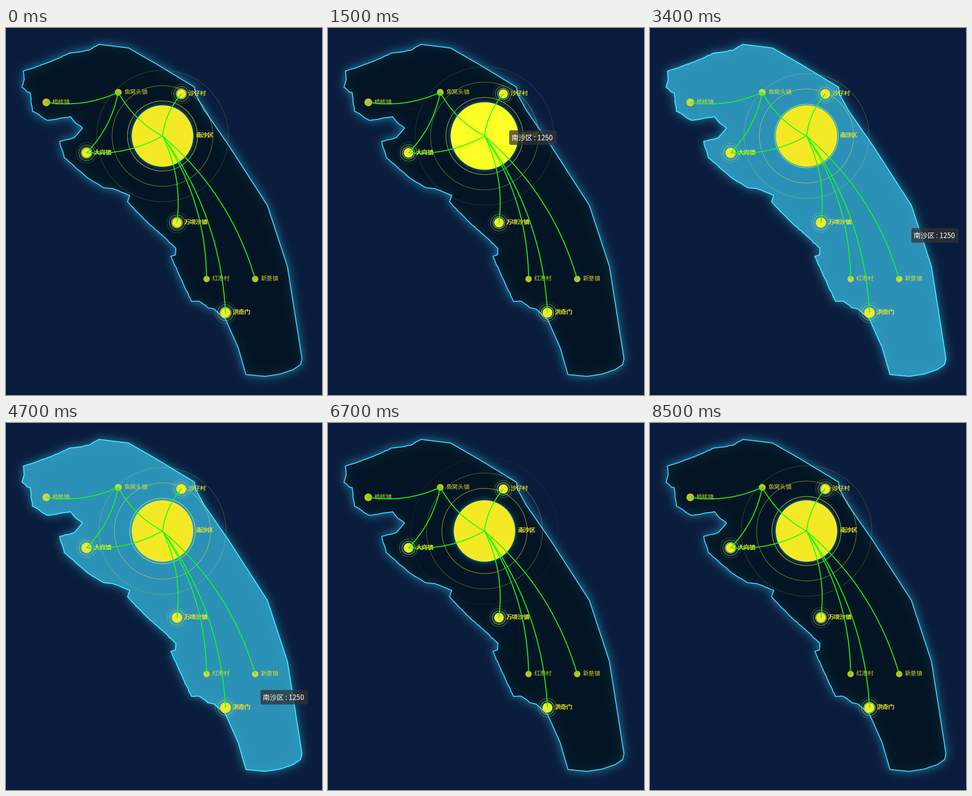
Write a matplotlib script that moves like this. It is 694 px wide and 807 px high and loops after 8600 ms.

```python
import numpy as np
import matplotlib.pyplot as plt
from matplotlib.animation import FuncAnimation
from matplotlib.colors import to_rgb
from matplotlib.patches import Circle, FancyBboxPatch, PathPatch, Polygon
from matplotlib.path import Path

W, H, DPI = 694, 807, 100
FRAMES, STEP = 86, 100
PX = 72 / DPI  # points per pixel

NIGHT, LAND, LAND_LIT = "#091c3d", "#031525", "#2b91b7"
EDGE, EDGE_LIT, HALO = "#3fdaff", "#45f0ff", "#05c3f9"
YELLOW, YELLOW_LIT, GREEN = "#f4e925", "#ffff26", "#12ff12"
FONT = "Noto Sans CJK JP"

# Corners of the smooth east shore and of the ragged west shore
EAST = [(204, 36), (269, 44), (330, 79), (414, 130), (416, 145), (435, 180),
        (489, 258), (574, 390), (618, 524), (650, 727), (647, 740),
        (631, 751), (602, 761), (569, 766), (527, 762), (510, 703),
        (482, 640)]
WEST = [(457, 618), (443, 615), (425, 601), (407, 601), (389, 562),
        (362, 502), (372, 499), (373, 484), (304, 421), (267, 382),
        (272, 368), (234, 353), (214, 351), (180, 330), (128, 285),
        (118, 249), (150, 241), (168, 220), (153, 209), (142, 195),
        (91, 203), (58, 183), (53, 142), (47, 141), (35, 130), (40, 113),
        (38, 95), (98, 74), (137, 56), (182, 49), (204, 36)]

# name: x, y, radius
HUBS = {"南沙区": (343.7, 237.5, 67.5), "沙仔村": (385, 145, 10),
        "大岗镇": (177, 274.5, 10.5), "万顷沙镇": (375.5, 428, 10.5),
        "洪奇门": (482, 626, 10.8)}
TOWNS = {"鱼窝头镇": (246.5, 141.5, 7.5), "榄核镇": (88.5, 163.5, 8.5),
         "红港村": (440.5, 552, 7), "新垦镇": (547.3, 552, 7)}
PLACES = {**HUBS, **TOWNS}
CENTER, FORK = "南沙区", "鱼窝头镇"
FORK_ENDS = ("榄核镇", "大岗镇")

# Frame spans, end exclusive
HOVER = (11, 17)
TIP = (11, 65)
LIT = [(17, 24), (28, 40), (42, 52)]
# Tooltip waypoints: frame, x, y
TRAIL = [(15, 398, 225), (26, 488, 268), (34, 574, 440), (37, 590, 490),
         (47, 559, 587), (55, 499, 643), (64, 497, 655)]


def ragged(points, step=6, size=0.8):
    rng = np.random.default_rng(4)
    out = []
    for a, b in zip(points, points[1:]):
        a, b = np.array(a, float), np.array(b, float)
        n = max(1, int(np.hypot(*(b - a)) / step))
        out.append(a)
        out += [a + (b - a) * i / n + rng.uniform(-size, size, 2)
                for i in range(1, n)]
    return out


def blur(a, sigma):
    n = int(3 * sigma)
    kernel = np.exp(-0.5 * (np.arange(-n, n + 1) / sigma) ** 2)
    kernel /= kernel.sum()
    for axis in (0, 1):
        a = np.apply_along_axis(np.convolve, axis, a, kernel, "same")
    return a


def mix(img, color, alpha):
    return img + (np.array(to_rgb(color)) - img) * alpha[..., None]


coast = np.array(EAST + ragged(WEST))
gx, gy = np.meshgrid(np.arange(W) + 0.5, np.arange(H) + 0.5)
land = Path(coast).contains_points(np.c_[gx.ravel(), gy.ravel()])
land = land.reshape(H, W).astype(float)
soft = blur(land, 10)
rim = 2 * np.hypot(*np.gradient(soft))


def hub_radius(name, hover):
    return HUBS[name][2] * (1.1 if hover and name == CENTER else 1)


def backdrop(lit, hover):
    img = np.ones((H, W, 3)) * to_rgb(NIGHT)
    img = mix(img, EDGE, 0.5 * soft)
    img = mix(img, LAND_LIT if lit else LAND, land)
    img = mix(img, EDGE, 0.5 * rim)
    for name, (x, y, _) in HUBS.items():
        gap = np.hypot(gx - x, gy - y) - hub_radius(name, hover)
        glow = 0.65 / (1 + np.exp(np.clip(gap / 3, -30, 30)))
        img = mix(img, HALO, glow)
    return (img * 255).round().astype(np.uint8)


SCENES = {s: backdrop(*s) for s in [(False, False), (True, False),
                                    (False, True)]}

fig = plt.figure(figsize=(W / DPI, H / DPI), dpi=DPI, facecolor=NIGHT)
ax = fig.add_axes([0, 0, 1, 1])
ax.axis("off")
scene = ax.imshow(SCENES[False, False], extent=(0, W, H, 0), aspect="auto",
                  interpolation="nearest")
ax.set_xlim(0, W)
ax.set_ylim(H, 0)


def put_text(x, y, s, size, color, z, **kw):
    return ax.text(x, y, s, fontsize=size * PX, color=color, family=FONT,
                   va="center", ha="left", zorder=z, **kw)


def put_disc(x, y, r, **kw):
    return ax.add_patch(Circle((x, y), r, fc=YELLOW, ec="none", **kw))


def put_route(a, b, bend=0.15):
    (x1, y1), (x2, y2) = PLACES[a][:2], PLACES[b][:2]
    mid = ((x1 + x2) / 2 - (y1 - y2) * bend, (y1 + y2) / 2 - (x2 - x1) * bend)
    path = Path([(x1, y1), mid, (x2, y2)],
                [Path.MOVETO, Path.CURVE3, Path.CURVE3])
    ax.add_patch(PathPatch(path, fill=False, ec=GREEN, lw=2 * PX, zorder=6,
                           capstyle="butt"))


border = ax.add_patch(Polygon(coast, fill=False, ec=EDGE, lw=2 * PX, zorder=2,
                              joinstyle="round"))

for name, (x, y, r) in TOWNS.items():
    put_disc(x, y, r, alpha=0.8, zorder=3)
    put_text(x + r + 5, y - 0.8, name, 13, YELLOW, 5, alpha=0.85)

rings, discs, labels = [], {}, {}
for name, (x, y, r) in HUBS.items():
    for j in range(3):
        ring = Circle((x, y), r, fill=False, ec=YELLOW, lw=PX, zorder=3)
        rings.append((ax.add_patch(ring), r, j))
    discs[name] = put_disc(x, y, r, zorder=4)
    # Two close copies give the heavier look of these labels
    labels[name] = [put_text(x + r + 5 + dx, y - 0.8, name, 13, YELLOW, 5)
                    for dx in (0, 0.6)]

for name in PLACES:
    if name not in (CENTER, *FORK_ENDS[:1]):
        put_route(CENTER, name)
for name in FORK_ENDS:
    put_route(FORK, name)

tip_box = ax.add_patch(FancyBboxPatch(
    (0, 0), 104, 32, boxstyle="round,pad=0,rounding_size=4",
    fc=(0.196, 0.196, 0.196, 0.75), ec="none", zorder=8))
tip_text = put_text(0, 0, "南沙区 : 1250", 15.3, "white", 9)


def within(k, span):
    return span[0] <= k < span[1]


def draw(k):
    lit = any(within(k, s) for s in LIT)
    hover = within(k, HOVER)
    scene.set_data(SCENES[lit, hover])
    border.set_edgecolor(EDGE_LIT if lit else EDGE)

    # Ripples grow to 2.5 times the disc while they fade
    wave = (0.281 + 0.082 * k) % 1
    for ring, r, j in rings:
        p = (wave + j) / 3
        ring.set_radius(r * (1 + 1.5 * p))
        ring.set_alpha(1 - p)

    r = hub_radius(CENTER, hover)
    discs[CENTER].set_radius(r)
    discs[CENTER].set_facecolor(YELLOW_LIT if hover else YELLOW)
    for i, label in enumerate(labels[CENTER]):
        label.set_x(HUBS[CENTER][0] + r + 5 + 0.6 * i)

    shown = within(k, TIP)
    frames, xs, ys = zip(*TRAIL)
    x, y = round(np.interp(k, frames, xs)), round(np.interp(k, frames, ys))
    tip_box.set(visible=shown, x=x, y=y)
    tip_text.set(visible=shown, position=(x + 5, y + 16.5))
    return []


anim = FuncAnimation(fig, draw, frames=FRAMES, interval=STEP, repeat=True,
                     repeat_delay=0, init_func=lambda: draw(0))
plt.show()
```
